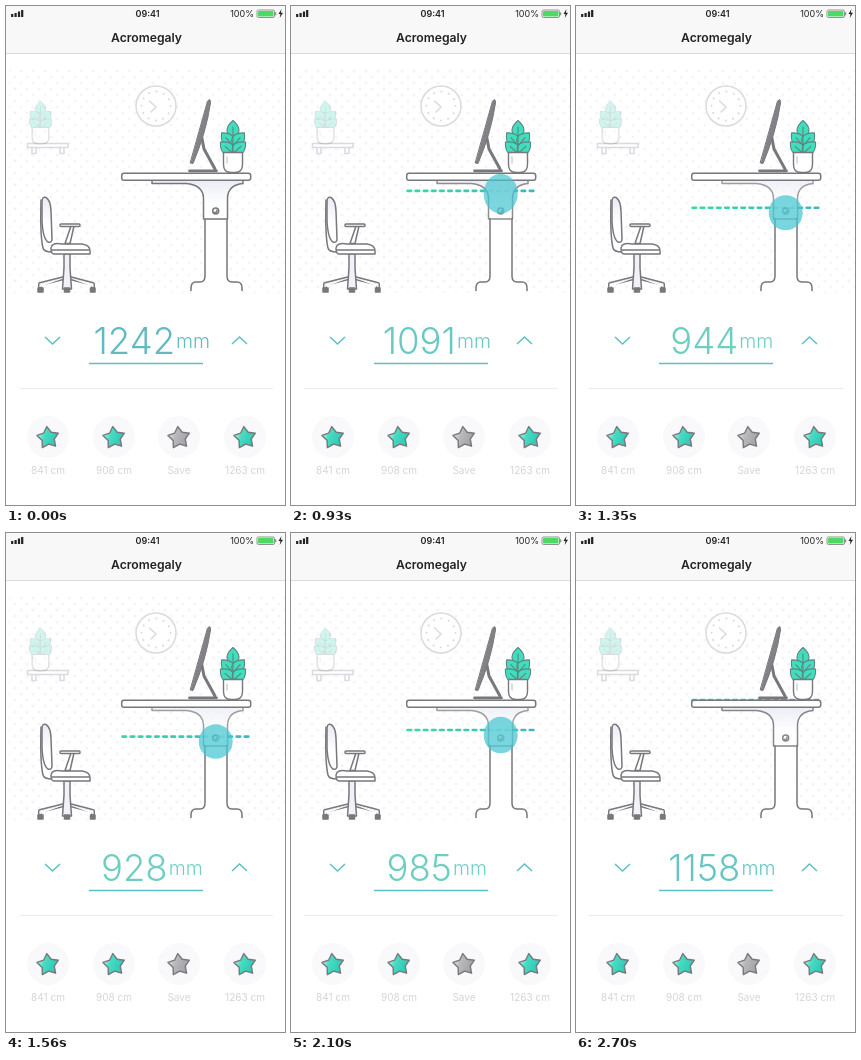
Recreate the animation shown at these times as an HTML page. Size 279 px wide and 499 px high, loop 2.73 s.

```html
<!DOCTYPE html>
<html lang="en">
<head>
<meta charset="utf-8">
<title>Desk height</title>
<style>
html, body { margin: 0; width: 100%; height: 100%; overflow: hidden; background: #fff; }
svg { display: block; width: 100%; height: 100%; font-family: Inter, Roboto, sans-serif; }
.line { fill: #fff; stroke: #77777c; stroke-width: 1.5; stroke-linecap: round; stroke-linejoin: round; }
.open { fill: none; }
.pale { fill: none; stroke: #dcd9e1; stroke-width: 1.5; stroke-linecap: round; }
.accent { fill: none; stroke: #5bc0c3; stroke-width: 1.5; }
.status { font-size: 9px; fill: #222; }
.label { font-size: 10px; fill: #d5d4da; text-anchor: middle; }
</style>
</head>
<body>
<svg viewBox="0 0 279 499" preserveAspectRatio="none">
  <defs>
    <linearGradient id="ink" gradientUnits="userSpaceOnUse" x1="83" x2="201" y1="0" y2="0">
      <stop id="inkA"/><stop id="inkB" offset="1"/>
    </linearGradient>
    <linearGradient id="dash" gradientUnits="userSpaceOnUse" x1="115" x2="244" y1="0" y2="0">
      <stop stop-color="#35dba5"/><stop offset="1" stop-color="#3fb7bb"/>
    </linearGradient>
    <linearGradient id="mint" x2="1" y2=".5">
      <stop stop-color="#effffb"/><stop offset=".45" stop-color="#45dcc0"/><stop offset="1" stop-color="#30c7b6"/>
    </linearGradient>
    <linearGradient id="gray" x2="1" y2=".5">
      <stop stop-color="#f4f4f5"/><stop offset=".45" stop-color="#b9b9bc"/><stop offset="1" stop-color="#a2a2a6"/>
    </linearGradient>
    <linearGradient id="steel" x2="0" y2="1"><stop stop-color="#e9ecf4"/><stop offset=".6" stop-color="#fff"/></linearGradient>
    <pattern id="dots" width="12" height="12" y="62" patternUnits="userSpaceOnUse">
      <g fill="#f5f3f7"><circle cx="3" cy="3" r="1.5"/><circle cx="9" cy="9" r="1.5"/></g>
    </pattern>
    <g id="leaf">
      <path d="M0 0C-9-4-7-11 0-17C7-11 9-4 0 0Z" fill="#3fdfbd"/>
      <path d="M0 0V-11" fill="none"/>
    </g>
    <g id="plant" stroke="#5f8482" stroke-width="1.1" stroke-linejoin="round">
      <use href="#leaf" transform="translate(0 -15)"/>
      <use href="#leaf" transform="translate(0 -7) rotate(-42)"/>
      <use href="#leaf" transform="translate(0 -7) rotate(42)"/>
      <use href="#leaf" transform="translate(0 1) rotate(-48)"/>
      <use href="#leaf" transform="translate(0 1) rotate(48)"/>
      <path d="M0 0V-15" fill="none"/>
      <path d="M-9.5 0H9.5V12Q9.5 20 2 20H-2Q-9.5 20-9.5 12Z" fill="#fff" stroke="#77777c" stroke-width="1.4"/>
      <path d="M-6 4V11" fill="none" stroke="#d8dce3" stroke-width="2"/>
    </g>
  </defs>

  <rect width="279" height="499" fill="#fff"/>
  <rect y="62" x="3" width="276" height="225" fill="url(#dots)"/>
  <rect width="279" height="47.5" fill="#f8f8f8"/>
  <path d="M0 47.5H279" stroke="#dadadc"/>
  <path d="M6.2 8V11M9.6 7V11M13 5.5V11M16.2 4V11" stroke="#222" stroke-width="2.2"/>
  <text class="status" x="141.5" y="11" text-anchor="middle" font-weight="600">09:41</text>
  <text class="status" x="248" y="11" text-anchor="end">100%</text>
  <rect x="251" y="4" width="17.5" height="7.5" rx="1.5" fill="#fff" stroke="#777" stroke-width=".8"/>
  <rect x="252" y="5" width="15.5" height="5.5" rx=".7" fill="#4cd964"/>
  <path d="M269.7 6.3V9.3" stroke="#777"/>
  <path d="M275.5 3L272.5 8H274.5L273.7 12L277 6.8H274.8Z" fill="#222"/>
  <text x="140.5" y="36" text-anchor="middle" font-size="12.2" font-weight="600" fill="#222">Acromegaly</text>

  <g class="pale">
    <circle cx="150" cy="100" r="20" fill="#fff"/>
    <circle cx="150" cy="100" r="14.5" stroke-width="2" stroke-dasharray=".1 7.492"/>
    <path d="M143.5 95L150 101L145 106"/>
    <path d="M21.5 137.5H62V141.5H21.5ZM26 141.5V147.5H30V141.5M54 141.5V147.5H58V141.5" fill="#fff"/>
  </g>
  <use href="#plant" transform="translate(34.5 121.5) scale(.88 .82)" opacity=".25"/>

  <g class="line">
    <path d="M58 272L34 278V282M64 272L87 278V282" stroke-width="4"/>
    <path d="M58 272L34 278V281M64 272L87 278V281" stroke="#f0f2f7" stroke-width="1.2"/>
    <path d="M58 248H64V262L65.5 283H56.5L58 262Z" fill="#f0f2f7"/>
    <path d="M32 282H37V286H32ZM58.5 282H63.5V286H58.5ZM84.5 282H89V286H84.5Z" fill="#77777c"/>
    <path d="M36 196Q36 190 40 191.5Q44.5 194 45 205L46 233Q46 237 42 236Q37 233 36 215Z" fill="url(#steel)"/>
    <path class="open" d="M35 194Q34 230 37 242Q38 246 46 246"/>
    <path d="M45 242Q46 236 56 238H76Q84 239 84 245V248H48Q45 248 45 242Z"/>
    <path class="open" d="M46 244H83"/>
    <path d="M68 220L64 237.5H59L65 220Z"/>
    <rect x="54" y="218" width="20" height="2.5" rx="1"/>
  </g>

  <path id="level" d="M116.5 0H243" fill="none" stroke="url(#dash)" stroke-width="2.6" stroke-linecap="round" stroke-dasharray="3.6 4.55"/>

  <g class="line">
    <path d="M199 212V270Q199 276 194 276H190Q185 276 185 282V286H236V282Q236 276 231 276H226Q221 276 221 270V212"/>
    <path d="M185 286H236" stroke="#fff" stroke-width="2"/>
    <g id="bracket">
      <path d="M146 174V177.5H180Q197 179 197.5 192V213H221.5V192Q222 179 237 177.5V174Z" fill="url(#steel)"/>
      <circle cx="209.7" cy="205" r="3"/>
      <path class="open" d="M208.5 206.5Q211 207 211 204"/>
    </g>
    <rect x="115.7" y="167.2" width="129" height="7" rx="2.3"/>
    <path class="open" d="M195.5 130L198 143L209 163" stroke-width="3"/>
    <path class="open" d="M183.5 164.8H210.5" stroke-width="2.8"/>
    <path d="M201.5 95.5Q204.5 91 204.5 97Q200 127 187 157.5L184.5 157Z" fill="#818186" stroke-width="1"/>
  </g>
  <use href="#plant" transform="translate(227 146.5)"/>

  <ellipse id="touch" cx="209.7" rx="17" fill="#46c6d1"/>

  <text x="145.8" y="348.3" text-anchor="middle" font-size="36.5" font-weight="300" fill="url(#ink)"><tspan id="height"></tspan><tspan font-size="19.5" dx="1" dy="-6.5">mm</tspan></text>
  <path class="accent" d="M83 357.6H197"/>
  <path class="accent" d="M39 331L46.5 338L54 331M226 338L233.5 331L241 338"/>
  <path d="M13 382.5H267" stroke="#ececee"/>
  <g id="presets"></g>
</svg>
<script>
const LOOP = 2730, STEP = 30;
const el = id => document.getElementById(id);
const mix = (a, b, k) => a + (b - a) * k;

// Smooth curve through [time, value] points, flat at turning points.
function track(points, t) {
  const last = points.length - 1;
  if (t <= points[0][0]) return points[0][1];
  if (t >= points[last][0]) return points[last][1];
  const i = points.findIndex(p => p[0] > t) - 1;
  const rise = n => (points[n + 1][1] - points[n][1]) / (points[n + 1][0] - points[n][0]);
  const tangent = n => {
    if (n === 0 || n === last) return 0;
    const a = rise(n - 1), b = rise(n);
    return a * b > 0 ? 2 * a * b / (a + b) : 0;
  };
  const span = points[i + 1][0] - points[i][0], u = (t - points[i][0]) / span, v = 1 - u;
  return v * v * (1 + 2 * u) * points[i][1] + u * u * (3 - 2 * u) * points[i + 1][1]
    + span * u * v * (v * tangent(i) - u * tangent(i + 1));
}

const drag = [[720, 1242], [780, 1222], [900, 1115], [1020, 1028], [1140, 982],
  [1350, 944], [1620, 927], [1680, 927], [1770, 930], [2100, 985]];
const heightTrack = [...drag, [2400, 1080], [2670, 1158]];
const levelTrack = [...drag.map(([t, mm]) => [t, 203.4 - (mm - 930) * .1154]), [2400, 181], [2670, 167]];
const touchFade = [[510, 0], [720, .65], [1080, .72], [2370, .72], [2640, 0]];
const levelFade = [[750, 0], [900, 1]];
const activeTrack = [[720, 0], [1110, 1], [2250, 1], [2670, .4]];

function star(x, label, paint) {
  const corner = n => {
    const a = (n * 36 - 90) * Math.PI / 180, r = n % 2 ? 6.4 : 11.3;
    return `${(r * Math.cos(a)).toFixed(2)} ${(r * Math.sin(a)).toFixed(2)}`;
  };
  const outline = "M" + Array.from({ length: 10 }, (_, n) => corner(n)).join("L") + "Z";
  return `<circle cx="${x}" cy="431" r="21" fill="#f9f8fa"/>
    <path transform="translate(${x} 431.8) rotate(-6)" d="${outline}" fill="url(#${paint})"
      stroke="#77777c" stroke-width="1.4" stroke-linejoin="round"/>
    <text class="label" x="${x}" y="468">${label}</text>`;
}
el("presets").innerHTML = [[42, "841 cm"], [108, "908 cm"], [173, "Save"], [239, "1263 cm"]]
  .map(([x, label]) => star(x, label, label === "Save" ? "gray" : "mint")).join("");

function draw(now) {
  const t = Math.floor(now % LOOP / STEP) * STEP;
  const y = track(levelTrack, t), active = track(activeTrack, t);
  const speed = Math.abs(y - track(levelTrack, t - STEP));
  el("height").textContent = Math.round(track(heightTrack, t));
  el("level").setAttribute("transform", `translate(0 ${y})`);
  el("level").setAttribute("opacity", track(levelFade, t));
  el("touch").setAttribute("cy", y + mix(0, 5, active));
  el("touch").setAttribute("ry", 17 + Math.min(3, speed * 1.5));
  el("touch").setAttribute("opacity", track(touchFade, t));
  el("bracket").setAttribute("opacity", mix(1, .7, active));
  const shade = hue => `hsl(${mix(185, hue, active)} ${mix(43, 50, active)}% ${mix(57, 62, active)}%)`;
  el("inkA").setAttribute("stop-color", shade(168));
  el("inkB").setAttribute("stop-color", shade(176));
  requestAnimationFrame(draw);
}
draw(performance.now());
</script>
</body>
</html>
```
